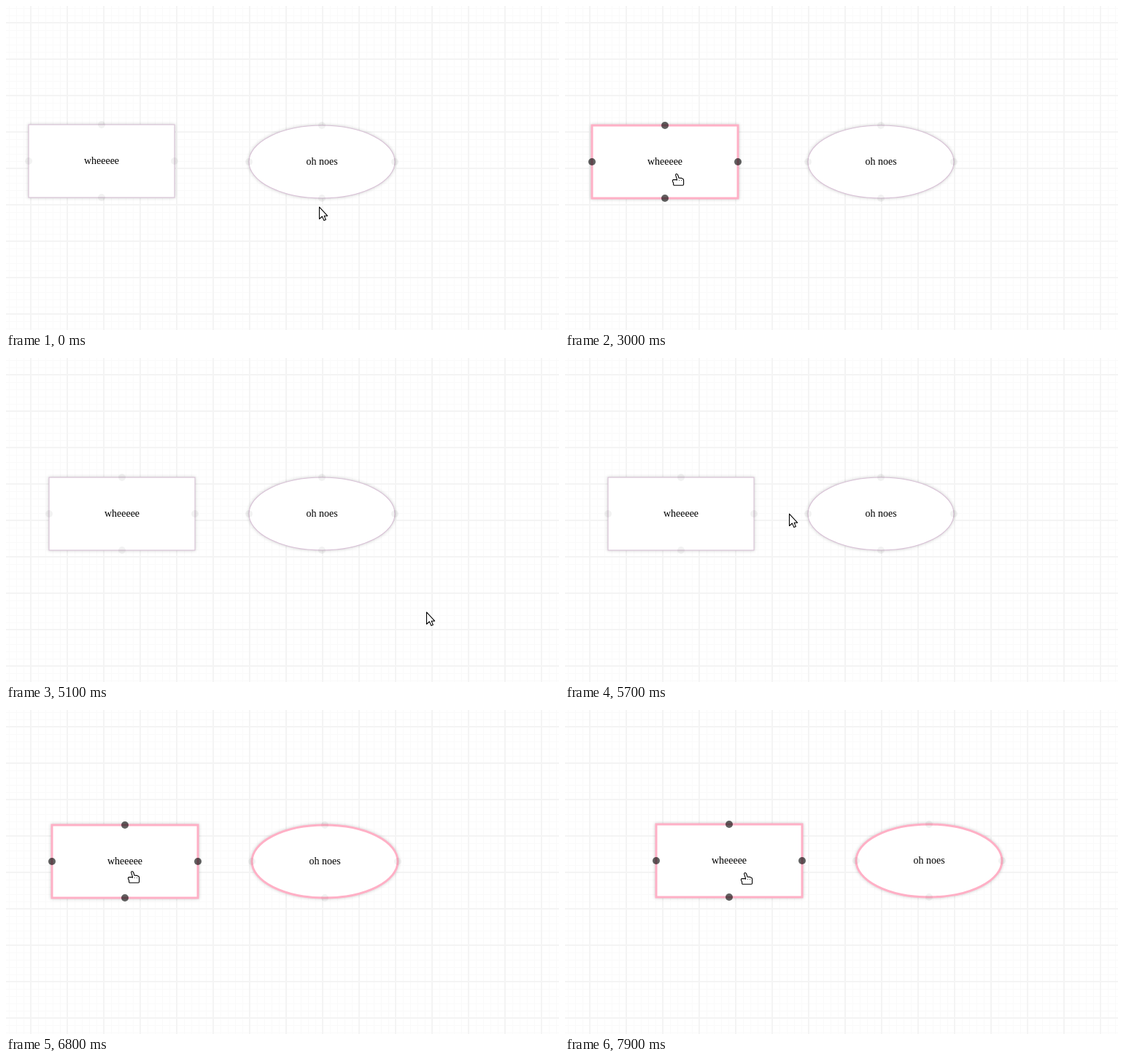
Write an HTML page that moves like this. It is 758 by 445 pixels and loops after 8 s.

```html
<!DOCTYPE html>
<html lang="en">
<head>
<meta charset="utf-8">
<title>Dragging nodes on a grid</title>
<style>
  html, body { margin: 0; width: 100%; height: 100%; overflow: hidden; background: #fff; }
  svg { display: block; width: 758px; height: 445px; }
  .minor { fill: none; stroke: #fafafa; stroke-width: 1; }
  .major { fill: none; stroke: #f4f4f4; stroke-width: 2; }
  .body { fill: #fff; stroke: #d8c1d6; stroke-width: 1.1; filter: drop-shadow(0 0 2px rgba(0, 0, 0, .2)); }
  .selected .body { stroke: #ffb0c6; stroke-width: 3; }
  .handle { fill: #000; opacity: .05; }
  .hover .handle { opacity: .62; }
  text { font: 14px "Liberation Serif", "Times New Roman", serif; text-anchor: middle; }
  .pointer { fill: #fff; stroke: #000; stroke-width: 1.1; stroke-linejoin: round; }
</style>
</head>
<body>
<svg viewBox="0 0 758 445">
  <defs>
    <pattern id="small" width="10" height="10" x="4" y="3" patternUnits="userSpaceOnUse">
      <path class="minor" d="M.5 0V10M0 .5H10"/>
    </pattern>
    <pattern id="large" width="50" height="50" x="9" y="-2" patternUnits="userSpaceOnUse">
      <path class="major" d="M25 0V50M0 25H50"/>
    </pattern>
  </defs>
  <rect width="758" height="445" fill="url(#small)"/>
  <rect width="758" height="445" fill="url(#large)"/>

  <g id="box">
    <rect class="body" x="-100" y="-50" width="200" height="100"/>
    <text x="-.03" y="4">wheeeee</text>
  </g>
  <g id="oval">
    <ellipse class="body" rx="100" ry="50"/>
    <text y="4">oh noes</text>
  </g>

  <g id="cursor">
    <path id="arrow" class="pointer" d="M.5 1.2V17.5L4.4 14L6.9 19.6L9.4 18.6L7.2 13.2H11.6Z"/>
    <g id="hand">
      <path class="pointer" d="M.6 2.2Q.8 .4 2.2 .7Q3.2 .9 3.7 2.2L5.1 6.2L8.6 6.4L10.8 7.4Q11.6 8 11.6 9.5V14.8Q11.6 16.2 10.3 16.2H-1.2Q-2.4 16.2 -2.4 14.8V13L-3.5 11Q-4 9 -2.6 8.6H2.6Z"/>
      <path d="M2 9.5H10" stroke="#444" stroke-dasharray="1 2" fill="none"/>
    </g>
  </g>
</svg>
<script>
const LOOP = 8000, STEP = 100;
const $ = id => document.getElementById(id);
const box = $('box'), oval = $('oval'), cursor = $('cursor'), hand = $('hand'), arrow = $('arrow');

for (const node of [box, oval])
  for (const [x, y] of [[-100, 0], [100, 0], [0, -50], [0, 50]]) {
    const dot = document.createElementNS('http://www.w3.org/2000/svg', 'circle');
    dot.setAttribute('class', 'handle');
    dot.setAttribute('cx', x);
    dot.setAttribute('cy', y);
    dot.setAttribute('r', 5);
    node.append(dot);
  }

// A drag circles around `mid` while drifting to `end`; angles in degrees, spin per step.
const first = { start: 2790, span: 1210, from: [131, 213], grip: [16, 15], end: [28, 1],
                mid: [20, -19], radius: [44, 28.5], phase: -6.6, spin: 60 };
const second = { start: 6600, span: 1200, from: [159, 214], grip: [20, 16], end: [66, -7],
                 mid: [15, -25], radius: [90, 66], phase: -49, spin: -63.5 };

function wander(d, t) {
  const u = Math.min(1, Math.max(0, (t - d.start) / d.span));
  const swell = Math.sin(Math.PI * u) ** 2;
  const angle = (d.phase + d.spin * (t - d.start) / STEP) * Math.PI / 180;
  return [Math.cos(angle), Math.sin(angle)].map((c, a) =>
    Math.round(d.end[a] * u + swell * (d.mid[a] + d.radius[a] * c)));
}

const add = (...points) => [0, 1].map(a => points.reduce((sum, p) => sum + p[a], 0));

// Free pointer stops: time, x, y
const stops = [
  [0, 429, 275], [600, 548, 336], [800, 548, 336], [1300, 150, 215], [1700, 560, 358],
  [2200, 147, 228], [3000, 147, 228], [4200, 175, 229], [4700, 480, 385], [5100, 576, 348],
  [5300, 576, 348], [6100, 38, 78], [6500, 179, 230], [LOOP, 179, 230]
];

function freePointer(t) {
  const i = stops.findIndex(s => s[0] > t);
  const [t0, ...a] = stops[i - 1], [t1, ...b] = stops[i];
  const k = (t - t0) / (t1 - t0), ease = k * k * (3 - 2 * k);
  return a.map((v, n) => Math.round(v + (b[n] - v) * ease));
}

const within = (t, a, b) => t >= a && t < b;
const place = (el, [x, y]) => el.setAttribute('transform', `translate(${x} ${y})`);

function draw(t) {
  const drag = t < 5000 ? first : second;
  const dragging = within(t, 3000, 4200) || t >= 6700;
  // Shapes trail the pointer by one step.
  const shift = t < 3000 ? [0, 0] : wander(drag, t - STEP);
  const boxAt = add(drag.from, shift);
  const ovalAt = drag === second ? add([433, 214], shift) : [433, 214];
  const pointer = dragging ? add(drag.from, drag.grip, wander(drag, t)) : freePointer(t);

  const lasso = within(t, 5400, 6100);
  const [dx, dy] = boxAt.map((v, a) => pointer[a] - v);
  const [ex, ey] = ovalAt.map((v, a) => pointer[a] - v);
  const overBox = dragging || !lasso && Math.abs(dx) < 100 && Math.abs(dy) < 50;
  const overOval = !dragging && !lasso && Math.hypot(ex / 100, ey / 50) < 1;

  place(box, boxAt);
  place(oval, ovalAt);
  place(cursor, pointer);
  box.classList.toggle('selected', within(t, 2600, 4900) || t >= 6000);
  oval.classList.toggle('selected', t >= 6000);
  box.classList.toggle('hover', overBox);
  oval.classList.toggle('hover', overOval);
  hand.style.display = overBox || overOval ? '' : 'none';
  arrow.style.display = overBox || overOval ? 'none' : '';
}

const origin = performance.now();
function tick() {
  const t = (performance.now() - origin) % LOOP;
  draw(Math.floor(t / STEP) * STEP);
  requestAnimationFrame(tick);
}
tick();
</script>
</body>
</html>
```
